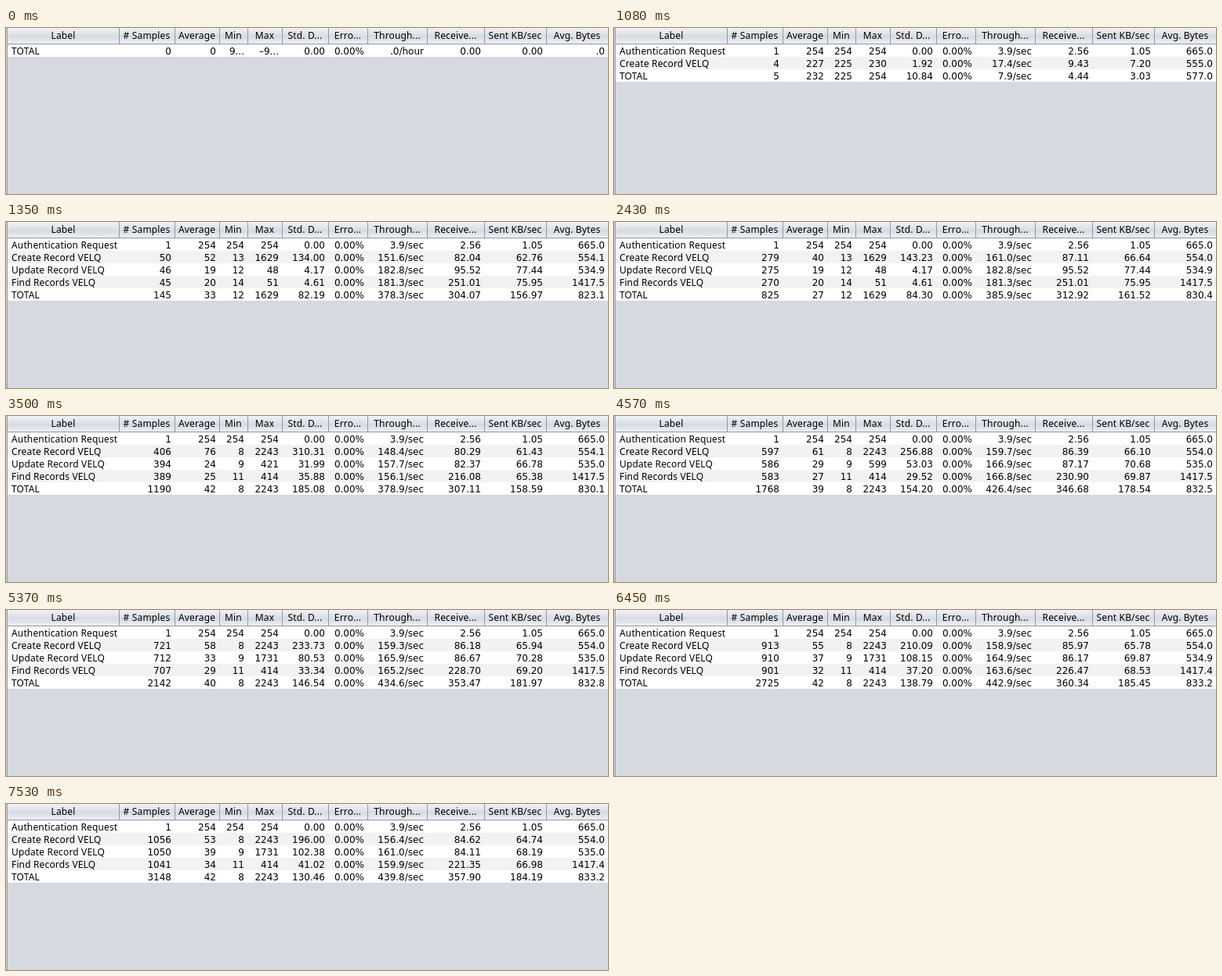
Write an HTML page that moves like this. It is 768x213 px and loops after 8000 ms.

```html
<!DOCTYPE html>
<html lang="en">
<head>
<meta charset="utf-8">
<title>Summary table</title>
<style>
  html, body { margin: 0; width: 100%; height: 100%; overflow: hidden; background: #d6d9df; }
  svg { display: block; width: 100%; height: 100%; }
  text { font: 12px "Noto Sans", "Open Sans", sans-serif; letter-spacing: .15px; fill: #000; }
  .head { text-anchor: middle; }
  .num { font-family: "DejaVu Sans", sans-serif; letter-spacing: 0; text-anchor: end; }
</style>
</head>
<body>
<svg viewBox="0 0 768 213">
  <defs>
    <linearGradient id="bar" x2="0" y2="1">
      <stop offset="0" stop-color="#f0f2f5"/>
      <stop offset=".45" stop-color="#dde0e6"/>
      <stop offset=".55" stop-color="#d6dae1"/>
      <stop offset="1" stop-color="#edf0f5"/>
    </linearGradient>
  </defs>
  <rect width="768" height="213" fill="#d6d9df"/>
  <rect x="2" width="766" height="20" fill="url(#bar)"/>
  <g id="header"></g>
  <rect x="1" y="20" width="767" height="1" fill="#8f959f"/>
  <rect x="1" width="1" height="213" fill="#92979f"/>
  <g id="body"></g>
  <path id="cursor" d="M0 0V15.2L3.5 12L5.8 17.2L8.3 16.1L6 11H10.8Z" stroke="#fff" visibility="hidden"/>
</svg>
<script>
const LOOP = 8000;
const ROW_TOP = 21, ROW_HEIGHT = 16;
const edges = [2, 144, 215, 272, 308, 352, 411, 461, 537, 610, 689, 768];
const titles = ['Label', '# Samples', 'Average', 'Min', 'Max', 'Std. D...', 'Erro...',
  'Through...', 'Receive...', 'Sent KB/sec', 'Avg. Bytes'];

// The table refreshes at each tick; known readings lie at the key times.
const ticks = [0, 1080, 1350, 1890, 2430, 2960, 3500, 4040, 4570, 4830, 5370, 5910, 6450, 6990, 7530];
const keys = [1080, 2430, 3500, 4570, 6450, 7530];

// Each series starts at key `from` and keeps its last value.
const requests = [
  { name: 'Authentication Request', from: 0, count: [1], avg: [254], min: [254], max: [254],
    dev: [0], received: [2.56], sent: [1.05], bytes: [665] },
  { name: 'Create Record VELQ', from: 0, count: [4, 279, 406, 597.9, 913, 1056],
    avg: [227, 40, 76, 61, 55.4, 53], min: [225, 13, 8], max: [230, 1629, 2243],
    dev: [1.92, 143.23, 310.31, 256.88, 210.09, 196],
    received: [9.43, 87.11, 80.29, 86.39, 85.97, 84.62],
    sent: [7.2, 66.64, 61.43, 66.1, 65.78, 64.74],
    bytes: [555, 554, 554.06, 554, 554, 554.03] },
  { name: 'Update Record VELQ', from: 1, count: [275, 394, 586, 910, 1050],
    avg: [19, 24, 29, 37.3, 39], min: [12, 9], max: [48, 421, 599, 1731],
    dev: [4.17, 31.99, 53.03, 108.15, 102.38],
    received: [95.52, 82.37, 87.17, 86.17, 84.11],
    sent: [77.44, 66.78, 70.68, 69.87, 68.19],
    bytes: [534.94, 535, 534.96, 534.94, 534.951] },
  { name: 'Find Records VELQ', from: 1, count: [270, 389, 583, 901, 1041],
    avg: [20, 25, 27, 32, 34], min: [14, 11], max: [51, 414],
    dev: [4.61, 35.88, 29.52, 37.2, 41.02],
    received: [251.01, 216.08, 230.9, 226.47, 221.35],
    sent: [75.95, 65.38, 69.87, 68.53, 66.98],
    bytes: [1417.5, 1417.46, 1417.5, 1417.44, 1417.44] }
];
const overall = {
  dev: [10.84, 84.3, 185.08, 154.2, 138.79, 130.46],
  received: [4.44, 312.92, 307.11, 346.68, 360.34, 357.9],
  sent: [3.03, 161.52, 158.59, 178.54, 185.45, 184.19]
};
const emptyTotal = ['TOTAL', '0', '0', '9...', '–9...', '0.00', '0.00%', '.0/hour', '0.00', '0.00', '.0'];

const el = id => document.getElementById(id);
const hold = (list, i) => list[Math.max(0, Math.min(i, list.length - 1))];
const countAt = (r, key) => key < r.from ? 0 : hold(r.count, key - r.from);
const sum = (list, f) => list.reduce((acc, item) => acc + f(item), 0);

// Running statistics blend in proportion to the samples behind them.
function blend(a, b, weightA, weightB, f) {
  const wa = weightA * (1 - f), wb = weightB * f;
  return (a * wa + b * wb) / (wa + wb);
}

function position(time) {
  const key = keys.findLastIndex(k => k <= time);
  const next = Math.min(key + 1, keys.length - 1);
  const f = next > key ? ((time - keys[key]) / (keys[next] - keys[key])) ** 1.1 : 0;
  return { key, next, f };
}

function reading(r, { key, next, f }) {
  const a = countAt(r, key), b = countAt(r, next);
  const mix = list => blend(hold(list, key - r.from), hold(list, next - r.from), a, b, f);
  const reached = (f > 0 ? next : key) - r.from;
  return {
    name: r.name, count: a + (b - a) * f, avg: mix(r.avg),
    min: hold(r.min, reached), max: hold(r.max, reached),
    dev: mix(r.dev), received: mix(r.received), sent: mix(r.sent), bytes: mix(r.bytes)
  };
}

function totalOf(rows, { key, next, f }) {
  const count = sum(rows, r => r.count);
  const a = sum(requests, r => countAt(r, key)), b = sum(requests, r => countAt(r, next));
  const mean = field => sum(rows, r => r.count * r[field]) / count;
  const mix = list => blend(list[key], list[next], a, b, f);
  return {
    name: 'TOTAL', count: Math.round(count), avg: mean('avg'), bytes: mean('bytes'),
    min: Math.min(...rows.map(r => r.min)), max: Math.max(...rows.map(r => r.max)),
    dev: mix(overall.dev), received: mix(overall.received), sent: mix(overall.sent)
  };
}

function cells(r) {
  const rate = r.received * 1024 / r.bytes;
  return [r.name, Math.floor(r.count), r.avg.toFixed(0), r.min, r.max, r.dev.toFixed(2), '0.00%',
    rate.toFixed(1) + '/sec', r.received.toFixed(2), r.sent.toFixed(2), r.bytes.toFixed(1)];
}

function tableAt(time) {
  if (time < keys[0]) return [emptyTotal];
  const at = position(time);
  const rows = requests.map(r => reading(r, at)).filter(r => r.count > 0);
  return [...rows, totalOf(rows, at)].map(cells);
}

function rowMarkup(row, i) {
  const top = ROW_TOP + i * ROW_HEIGHT;
  const texts = row.map((value, c) => c
    ? `<text class="num" x="${edges[c + 1] - 4}" y="${top + 13}">${value}</text>`
    : `<text x="7" y="${top + 13}">${value}</text>`);
  return `<rect x="2" y="${top}" width="766" height="${ROW_HEIGHT}" fill="${i % 2 ? '#f2f2f2' : '#fff'}"/>` + texts.join('');
}

el('header').innerHTML = titles.map((title, c) =>
  `<text class="head" x="${(edges[c] + edges[c + 1]) / 2}" y="14">${title}</text>` +
  (c ? `<rect x="${edges[c]}" width="1" height="20" fill="#9298a3"/>` : '')).join('');

let shown = -1;
function draw(now) {
  const time = now % LOOP;
  const tick = ticks.findLast(t => t <= time);
  if (tick !== shown) {
    shown = tick;
    el('body').innerHTML = tableAt(tick).map(rowMarkup).join('');
  }
  const cursor = el('cursor');
  cursor.setAttribute('visibility', time >= 3770 && time < 4300 ? 'visible' : 'hidden');
  cursor.setAttribute('transform', time < 4040 ? 'translate(353 140)' : 'translate(355 153)');
}

const start = performance.now();
function frame() {
  draw(performance.now() - start);
  requestAnimationFrame(frame);
}
frame();
</script>
</body>
</html>
```
